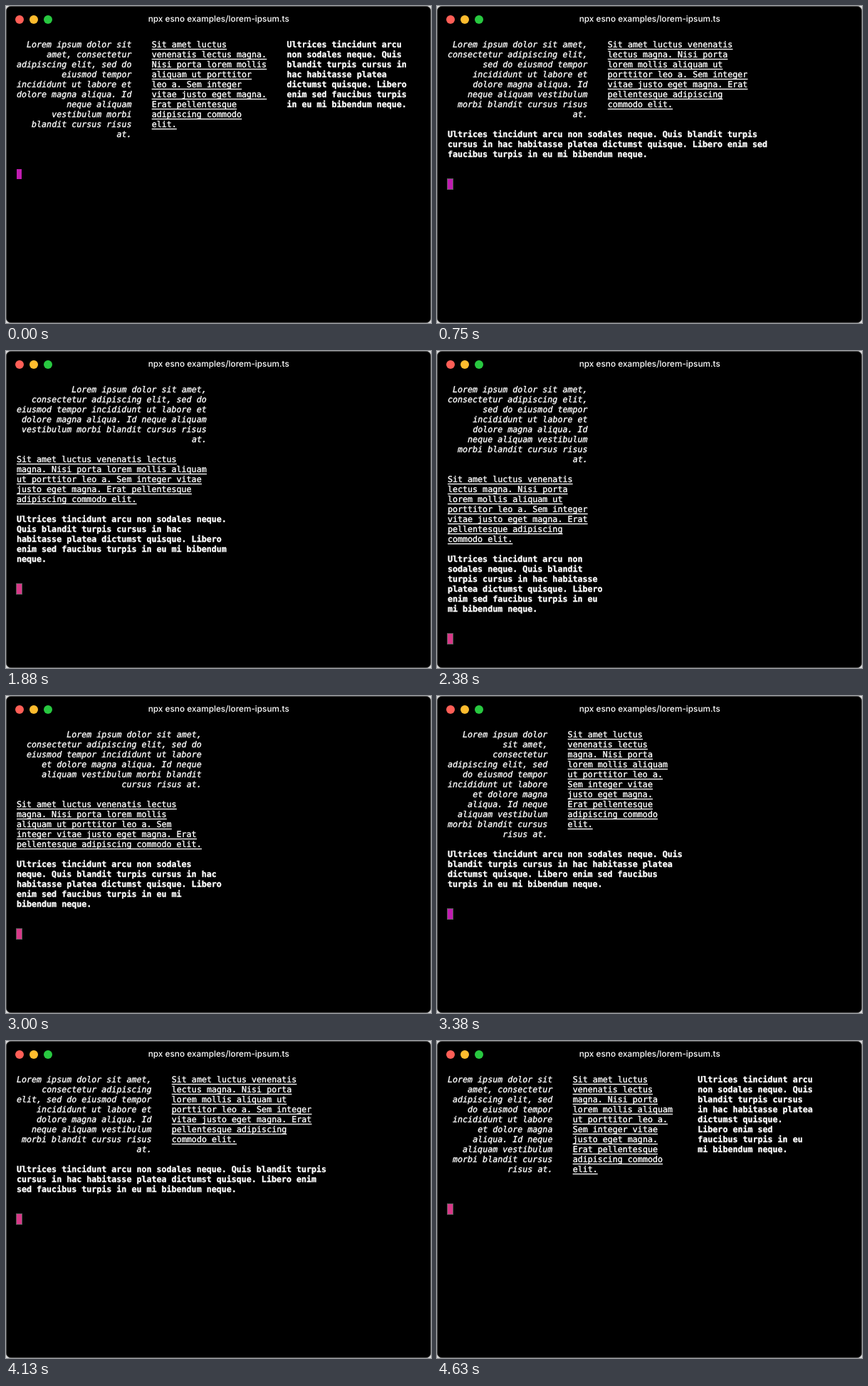
These frames come from a looping animation (597 by 445 pixels, 4.75 s). An HTML page:

```html
<!DOCTYPE html>
<html lang="en">
<head>
<meta charset="utf-8">
<title>Responsive terminal columns</title>
<style>
  html, body { margin: 0; width: 100%; height: 100%; overflow: hidden; background: #ddd; }
  svg { display: block; width: 597px; height: 445px; }
  text { fill: #fff; text-rendering: geometricPrecision; }
  .title { font: 500 11.8px Inter, "Liberation Sans", sans-serif; text-anchor: middle; }
  #screen { font: 11.67px "DejaVu Sans Mono", "Liberation Mono", monospace; }
  #screen text { stroke: #fff; stroke-width: .35px; }
  .italic { font-style: italic; }
  .bold { font-weight: bold; }
</style>
</head>
<body>
<svg viewBox="0 0 597 445">
  <rect x=".5" y=".5" width="596" height="444" rx="6" fill="#000" stroke="#505050"/>
  <circle cx="19" cy="19" r="6" fill="#ff5f57"/>
  <circle cx="39" cy="19" r="6" fill="#febc2e"/>
  <circle cx="59" cy="19" r="6" fill="#28c840"/>
  <text class="title" x="298.8" y="22.2">npx esno examples/lorem-ipsum.ts</text>
  <g id="screen"></g>
  <rect id="cursor"/>
</svg>
<script>
const LOOP = 4750, STEP_CS = 12.5;
const LEFT = 15, BASELINE = 58, CHAR = 7.026, LINE = 14, PAD = 4;
const paragraphs = [
  { style: 'italic', text: 'Lorem ipsum dolor sit amet, consectetur adipiscing elit, sed do eiusmod tempor incididunt ut labore et dolore magna aliqua. Id neque aliquam vestibulum morbi blandit cursus risus at.' },
  { style: 'underline', text: 'Sit amet luctus venenatis lectus magna. Nisi porta lorem mollis aliquam ut porttitor leo a. Sem integer vitae justo eget magna. Erat pellentesque adipiscing commodo elit.' },
  { style: 'bold', text: 'Ultrices tincidunt arcu non sodales neque. Quis blandit turpis cursus in hac habitasse platea dictumst quisque. Libero enim sed faucibus turpis in eu mi bibendum neque.' },
];
const screen = document.getElementById('screen');
const cursor = document.getElementById('cursor');

function wrap(text, width) {
  const lines = [];
  let line = '';
  for (const word of text.split(' ')) {
    const longer = line ? line + ' ' + word : word;
    if (longer.length > width) {
      lines.push(line);
      line = word;
    } else {
      line = longer;
    }
  }
  return [...lines, line];
}

// The window is dragged narrower, then wider, at a constant speed.
function columnsAt(step) {
  return Math.floor(Math.max(79 - 2.45 * step, 31.4 + 2.45 * (step - 20)));
}

// Each inner array is one table row of column widths.
function layout(columns) {
  if (columns > 66) {
    const side = Math.ceil(columns * 0.34);
    return [[side, side, columns - 2 * side]];
  }
  if (columns >= 48) {
    const half = Math.floor(columns / 2);
    return [[half, columns - half], [columns]];
  }
  return [[columns], [columns], [columns]];
}

function lineMarkup(line, col, row, style) {
  const x = LEFT + col * CHAR;
  const y = BASELINE + row * LINE;
  const rule = style === 'underline'
    ? `<rect x="${x}" y="${y + 2}" width="${line.length * CHAR}" height="1.3" fill="#fff"/>` : '';
  return `<text class="${style}" x="${x}" y="${y}">${line}</text>${rule}`;
}

function drawCursor(step, row) {
  const focused = step < 2 || (step >= 28 && step < 32);
  const magenta = step < 9 || (step >= 27 && step < 32);
  const outset = focused ? 0 : 0.5;
  cursor.setAttribute('x', LEFT - outset);
  cursor.setAttribute('y', 47 + row * LINE - outset);
  cursor.setAttribute('width', 7 + 2 * outset);
  cursor.setAttribute('height', 14 + 2 * outset);
  cursor.setAttribute('fill', magenta ? '#c01cb0' : '#d83888');
  cursor.setAttribute('stroke', focused ? 'none' : '#5c5c5c');
}

function draw(step) {
  const rows = layout(columnsAt(step));
  let markup = '', top = 0, index = 0;
  for (const widths of rows) {
    let left = 0, height = 0;
    for (const width of widths) {
      const { style, text } = paragraphs[index++];
      const inner = style === 'bold' ? width : width - PAD;
      const lines = wrap(text, inner);
      lines.forEach((line, i) => {
        const indent = style === 'italic' ? inner - line.length : 0;
        markup += lineMarkup(line, left + indent, top + i, style);
      });
      left += width;
      height = Math.max(height, lines.length);
    }
    top += height + 1;
  }
  screen.innerHTML = markup;
  drawCursor(step, top + (rows.length === 1 ? 2 : 1));
}

const start = performance.now();
let shown = -1;
function tick() {
  const time = (performance.now() - start) % LOOP;
  const step = Math.floor(Math.floor(time / 10) / STEP_CS);
  if (step !== shown) draw(shown = step);
  requestAnimationFrame(tick);
}
tick();
</script>
</body>
</html>
```
